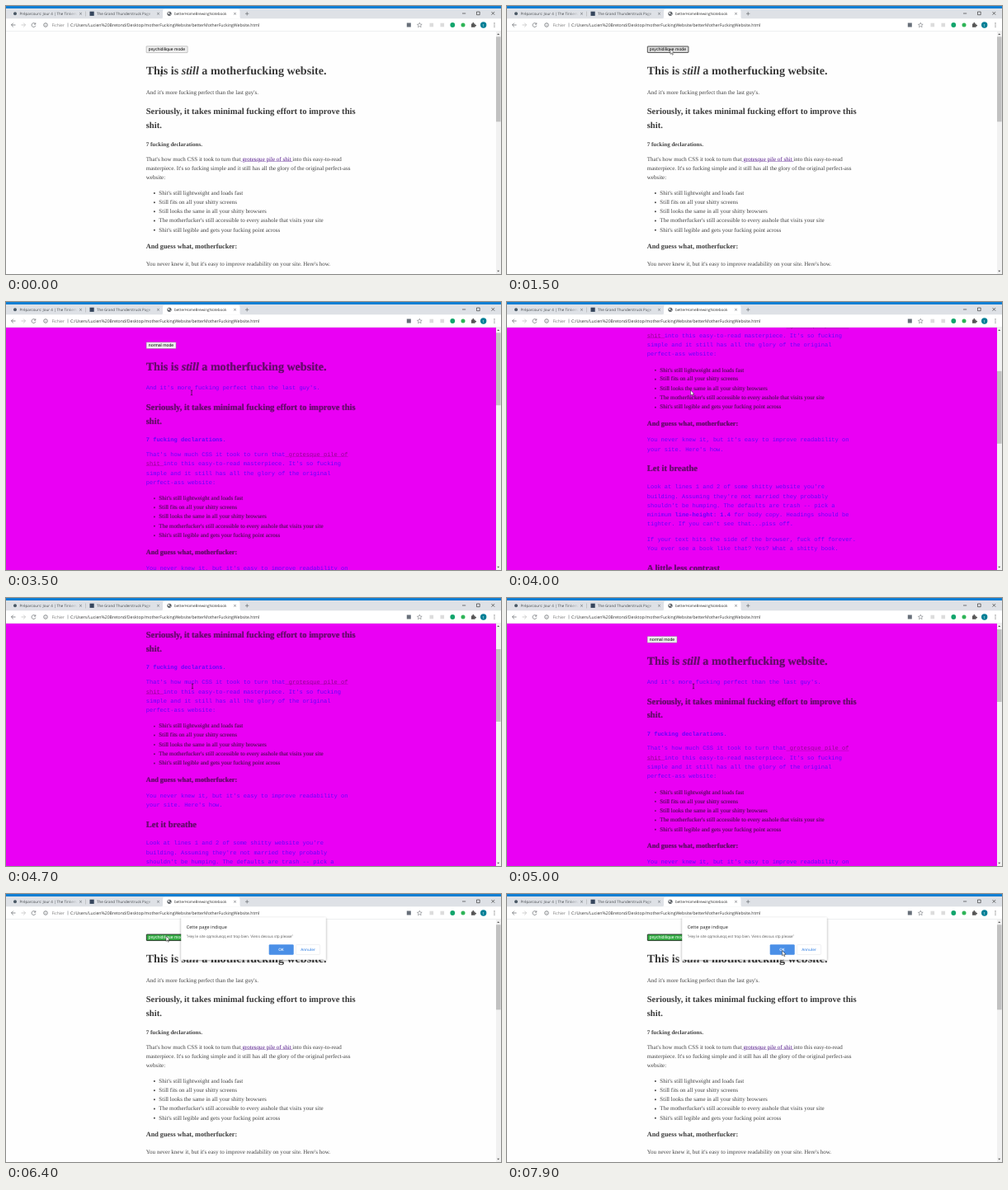
An HTML page for the animation above (8000 ms loop, 600x325 px).

```html
<!DOCTYPE html>
<html lang="fr">
<head>
<meta charset="utf-8">
<title>Mode switch</title>
<style>
html, body { margin: 0; width: 100%; height: 100%; overflow: hidden; background: #fff; }
#stage { position: relative; width: 600px; height: 325px; overflow: hidden; text-rendering: geometricPrecision; }
#view { position: absolute; top: 30.5px; left: 0; width: 594px; height: 295px; overflow: hidden; background: #fefefe; }
#view.psy { background: #ea00f4; }
#page { width: 1519px; transform-origin: 0 0; font: 18px/1.6 "Liberation Serif", serif; color: #444; }
#page main { width: 650px; margin: 0 auto; padding-top: 40px; }
h1, h2, h3 { color: #3a3a3a; }
a { color: #551a8b; text-decoration: underline; }
.psy #page, .psy h1, .psy h2, .psy h3 { color: #6a0a70; text-shadow: 0 0 2px; }
.psy p { color: #6205fb; font-family: "Liberation Mono", monospace; text-shadow: none; }
.psy a { color: #900690; }
button { font: 13.333px "Liberation Sans", sans-serif; height: 21px; padding: 0 7px; margin: 0; border: 1px solid #767676; border-radius: 2px; background: #efefef; color: #000; white-space: nowrap; text-shadow: none; text-rendering: inherit; }
button.focus { border: 2px solid #222; padding: 0 6px; background: #e0e0e0; }
button.green { border: 2px solid #111; padding: 0 6px; background: #35ad45; color: #fff; }
.psy button { text-shadow: none; }
.psy button.green { border-width: 3px; padding: 0 5px; border-radius: 6px; }
svg { position: absolute; left: 0; top: 0; font-family: "Open Sans", sans-serif; }
</style>
</head>
<body>
<div id="stage">
  <div id="view"><div id="page"><main>
    <button id="mode"></button>
    <h1>This is <em>still</em> a motherfucking website.</h1>
    <p>And it's more fucking perfect than the last guy's.</p>
    <h2>Seriously, it takes minimal fucking effort to improve this shit.</h2>
    <p><b>7 fucking declarations.</b></p>
    <p>That's how much CSS it took to turn that<a> grotesque pile of shit </a>into this easy-to-read masterpiece. It's so fucking simple and it still has all the glory of the original perfect-ass website:</p>
    <ul>
      <li>Shit's still lightweight and loads fast</li>
      <li>Still fits on all your shitty screens</li>
      <li>Still looks the same in all your shitty browsers</li>
      <li>The motherfucker's still accessible to every asshole that visits your site</li>
      <li>Shit's still legible and gets your fucking point across</li>
    </ul>
    <h3>And guess what, motherfucker:</h3>
    <p>You never knew it, but it's easy to improve readability on your site. Here's how.</p>
    <h2>Let it breathe</h2>
    <p>Look at lines 1 and 2 of some shitty website you're building. Assuming they're not married they probably shouldn't be humping. The defaults are trash -- pick a minimum <b>line-height: 1.4</b> for body copy. Headings should be tighter. If you can't see that...piss off.</p>
    <p>If your text hits the side of the browser, fuck off forever. You ever see a book like that? Yes? What a shitty book.</p>
    <h2>A little less contrast</h2>
    <p>Black on white? How often do you see that kind of contrast in real life? Tone it down a bit, asshole.</p>
  </main></div></div>

  <svg width="600" height="325" viewBox="0 0 600 325">
    <defs>
      <linearGradient id="fade"><stop offset=".8" stop-color="#dee1e6" stop-opacity="0"/><stop offset="1" stop-color="#dee1e6"/></linearGradient>
      <filter id="shadow" x="-10%" y="-10%" width="120%" height="140%"><feDropShadow dx="0" dy="1" stdDeviation="1.5" flood-opacity=".4"/></filter>
      <path id="close" d="M-1.3-1.3 1.3 1.3M1.3-1.3-1.3 1.3"/>
    </defs>

    <!-- tab strip -->
    <rect width="600" height="15.5" fill="#dee1e6"/>
    <rect width="600" height="3" fill="#0f7fd4"/>
    <path d="M188 15.5q2 0 2-2V6q0-2.3 2.3-2.3h89Q283.5 3.7 283.5 6v7.5q0 2 2 2z" fill="#fff"/>
    <g font-size="4.5" fill="#45494d">
      <text x="16.5" y="10.8">Préparcours: Jour 4 | The Tinkers</text>
      <text x="110" y="10.8">The Grand Thunderstruck Page</text>
      <text x="204" y="10.8" fill="#333">betterHomeBrewingNotebook</text>
    </g>
    <rect x="16" y="5" width="72" height="9" fill="url(#fade)"/>
    <rect x="110" y="5" width="71" height="9" fill="url(#fade)"/>
    <rect x="87.5" y="5" width="10" height="9" fill="#dee1e6"/>
    <path d="M96.5 6.5v6" stroke="#999" stroke-width=".4"/>
    <circle cx="11" cy="9.3" r="2" fill="#4b5966"/>
    <rect x="101.5" y="6.7" width="5.2" height="5.2" fill="#36465d"/>
    <circle cx="198" cy="9.3" r="2.6" fill="#5f6368"/>
    <path d="M196 8.5l1.5-1 1 1.5-1.2 1zM198.5 10.5l1.4-.8-.5 1.4z" fill="#fff"/>
    <g stroke="#55595e" stroke-width=".6" fill="none">
      <use href="#close" x="90.5" y="9.3"/><use href="#close" x="184.5" y="9.3"/><use href="#close" x="277.5" y="9.3"/>
      <path d="M290 9.3h4.4M292.2 7.1v4.4"/>
      <path d="M553 9h4.2M570.5 7h3.7v3.7h-3.7z" stroke="#222"/>
      <path d="M588.5 7l3.7 3.7M592.2 7l-3.7 3.7" stroke="#222"/>
    </g>

    <!-- toolbar -->
    <rect y="15.5" width="600" height="15" fill="#fff"/>
    <rect y="30.1" width="600" height=".4" fill="#d5d7da"/>
    <g stroke="#5f6368" stroke-width=".7" fill="none">
      <path d="M11.5 23h-5M8.8 20.6 6.4 23l2.4 2.4"/>
      <path d="M18.5 23h5M21.2 20.6l2.4 2.4-2.4 2.4" stroke="#bbb"/>
      <path d="M35.4 21.6a2.4 2.4 0 1 0 .4 2.2M35.8 20.3v1.8H34"/>
      <circle cx="48" cy="23" r="2.3"/><path d="M48 22.6v1.7M48 21.4v.5M75 20.5v5" stroke-width=".5"/>
      <path d="M489 0" />
      <path d="M489.3 20.2" />
      <path d="M489.3 20.2" transform="translate(0 0)"/>
      <path d="M489.3 20.2l.8 1.9 2.1.2-1.6 1.4.5 2-1.8-1.1-1.8 1.1.5-2-1.6-1.4 2.1-.2z" transform="translate(12 0)" stroke-width=".5"/>
    </g>
    <g font-size="5.13">
      <text x="55.5" y="24.7" font-size="5" fill="#777">Fichier</text>
      <text x="78" y="24.7" fill="#333">C:/Users/Lucien%20Bretond/Desktop/motherFuckingWebsite/betterMotherFuckingWebsite.html</text>
    </g>
    <rect x="485.8" y="20.5" width="5" height="5" fill="#68707a"/>
    <g fill="#dcdcdc"><rect x="513.5" y="20.7" width="4.6" height="4.6"/><rect x="526.5" y="20.7" width="4.6" height="4.6"/></g>
    <circle cx="541.3" cy="23" r="2.9" fill="#12a56c"/>
    <circle cx="554" cy="23" r="2.5" fill="#2fb457"/>
    <path d="M564 21.5h1.5a1 1 0 1 1 1.6 0h1.5v1.5a.9.9 0 1 1 0 1.3v1.5H564z" fill="#555"/>
    <circle cx="578.7" cy="23" r="3.7" fill="#057f96"/>
    <text x="577.7" y="24.7" font-size="4.5" fill="#fff">t</text>
    <g fill="#555"><circle cx="592" cy="20.9" r=".6"/><circle cx="592" cy="23" r=".6"/><circle cx="592" cy="25.1" r=".6"/></g>

    <!-- scrollbar -->
    <rect x="594" y="30.5" width="6" height="294.5" fill="#f1f1f1"/>
    <rect id="thumb" x="594" width="5.6" fill="#c1c1c1"/>
    <path d="M595.2 35l1.5-1.8 1.5 1.8zM595.2 320.8l1.5 1.8 1.5-1.8z" fill="#555"/>

    <g id="dialog">
      <rect x="212.3" y="28.5" width="175.4" height="51.3" rx="1" fill="#fff" filter="url(#shadow)"/>
      <text x="218.7" y="42.3" font-size="5.6" fill="#222">Cette page indique</text>
      <text x="218.7" y="53" font-size="4.7" fill="#666" font-family="Roboto, sans-serif">"Hey le site qqmolunqq est trop bien. Viens dessus stp please"</text>
      <rect x="318.7" y="61.2" width="30" height="12.5" rx="1.2" fill="#4a8fe7"/>
      <rect x="351.4" y="61.4" width="29.2" height="12.1" rx="1.2" fill="#fff" stroke="#dadce0" stroke-width=".4"/>
      <g font-size="4.6" font-weight="600" text-anchor="middle">
        <text x="333.5" y="69.2" fill="#fff">OK</text>
        <text x="366" y="69.2" fill="#4a8fe7">Annuler</text>
      </g>
    </g>

    <path id="arrow" d="M0 0v6.4l1.5-1.4 1 2.3.9-.4-1-2.2h2.1z" fill="#fff" stroke="#111" stroke-width=".45"/>
    <path id="beam" d="M-1.2-3q1.2 0 1.2.8Q0-3 1.2-3M0-2.2v4.4M-1.2 3q1.2 0 1.2-.8Q0 3 1.2 3" fill="none" stroke="#111" stroke-width=".6"/>
  </svg>
</div>

<script>
const LOOP = 8000, SCALE = 600 / 1536;
const $ = id => document.getElementById(id);

// [time, value...] keys, eased between neighbours
const pointer = [[0, 188, 82], [700, 188, 82], [1350, 198, 52], [2850, 198, 52], [3400, 225, 110],
  [3700, 225, 110], [4000, 222.5, 107], [4400, 222.5, 107], [4700, 226, 107], [5100, 226, 107],
  [5600, 194, 51], [6500, 194, 51], [7200, 333.5, 68.5], [LOOP, 333.5, 68.5]];
const scrolling = [[0, 0], [3550, 0], [4000, 398], [4380, 398], [5050, 0], [LOOP, 0]];

function at(keys, t) {
  const i = keys.findIndex(k => k[0] > t), a = keys[i - 1], b = keys[i];
  const u = (t - a[0]) / (b[0] - a[0]), e = u * u * (3 - 2 * u);
  return a.slice(1).map((v, n) => v + (b[n + 1] - v) * e);
}
const within = (t, from, to) => t >= from && t < to;
const show = (el, on) => el.style.display = on ? "" : "none";

function draw(now) {
  const t = now % LOOP;
  const psy = within(t, 2800, 5900);
  const [x, y] = at(pointer, t), [scroll] = at(scrolling, t);
  const pageHeight = psy ? 2405 : 2054;

  $("view").className = psy ? "psy" : "";
  $("page").style.transform = `scale(${SCALE}) translateY(${-scroll}px)`;
  $("mode").textContent = psy ? "normal mode" : "psychidilique mode";
  $("mode").className = t >= 5500 ? "green" : within(t, 1300, 2800) ? "focus" : "";

  $("thumb").setAttribute("y", 37.3 + 281 * scroll / pageHeight);
  $("thumb").setAttribute("height", 281 * 753 / pageHeight);
  show($("dialog"), t >= 6400);

  const overText = t < 1000 || within(t, 3250, 3750) || within(t, 4550, 5250);
  show($("beam"), overText);
  show($("arrow"), !overText);
  for (const id of ["beam", "arrow"]) $(id).setAttribute("transform", `translate(${x} ${y})`);
}

function tick() {
  draw(performance.now());
  requestAnimationFrame(tick);
}
tick();
</script>
</body>
</html>
```
